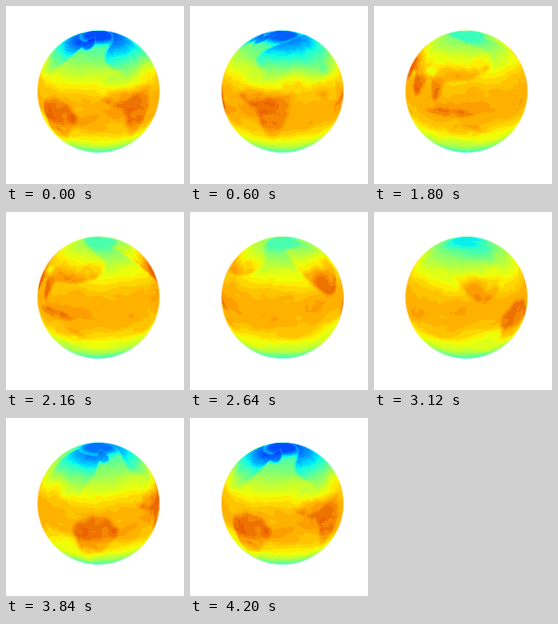
These frames come from a looping animation (178 by 178 pixels, 4320 ms). A matplotlib script:

```python
import numpy as np
import matplotlib.pyplot as plt
from matplotlib.animation import FuncAnimation

SIZE, FRAMES, STEP_MS = 178, 36, 120
CX, CY, RADIUS = 92, 85, 61
TILT = np.radians(20)
START_LON = -15

# One-degree world grid, south to north
LON, LAT = np.meshgrid(np.arange(-179.5, 180), np.arange(-89.5, 90))
SIN_LAT = np.sin(np.radians(LAT))
COS_LAT = np.cos(np.radians(LAT))


def east_of(lon):
    return (LON - lon + 180) % 360 - 180


def smoothstep(low, high, x):
    t = np.clip((x - low) / (high - low), 0, 1)
    return t * t * (3 - 2 * t)


def blur(grid, *reaches):
    for axis, reach in enumerate(reaches):
        shifts = range(-reach, reach + 1)
        grid = sum(np.roll(grid, s, axis) for s in shifts) / len(shifts)
    return grid


def noise(rng, high, wide):
    grid = blur(blur(rng.normal(size=LAT.shape), high, wide), high, wide)
    return grid / grid.std()


def oval(lon, lat, width, height):
    return (east_of(lon) / width) ** 2 + ((LAT - lat) / height) ** 2 < 1


def wedge(lon, north, south, width, lean=0):
    """Land narrowing to a point in the south, drifting east by lean."""
    t = (north - LAT) / (north - south)
    half = width * np.clip(1 - t, 0, 1) ** 0.6
    return (t >= 0) & (np.abs(east_of(lon + lean * t)) < half)


def bump(lon, lat, width, height, amount):
    return amount * np.exp(-(east_of(lon) / width) ** 2
                           - ((LAT - lat) / height) ** 2)


africa = oval(16, 19, 33, 16) | wedge(26, 8, -35, 17, -3)
asia = (oval(85, 52, 90, 25) | oval(47, 24, 11, 10)
        | wedge(78, 30, 7, 12) | wedge(103, 30, 8, 9))
north_america = wedge(-98, 72, 14, 50) | oval(-42, 72, 15, 11)
south_america = oval(-58, -8, 22, 16) | wedge(-57, -8, -54, 20, -12)
oceania = oval(134, -25, 20, 12) | oval(118, -2, 24, 4)
land = africa | asia | north_america | south_america | oceania

LAND = blur(blur(land.astype(float), 1, 1), 1, 2)
ICE = smoothstep(64, 80, LAT) * (1 - LAND)

rng = np.random.default_rng(7)
ROUGH = COS_LAT * (0.7 * noise(rng, 3, 9) + (0.3 + 0.7 * LAND) * noise(rng, 2, 3))

peru_current = bump(-88, -18, 26, 13, -5)
southern_chill = -5 * smoothstep(38, 58, -LAT)
SEA_BIAS = peru_current + southern_chill

sahel = bump(18, 11, 30, 8, 3)
arabia = bump(52, 29, 16, 9, 6)
tibet = bump(90, 34, 11, 5, -9)
sonora = bump(-108, 34, 11, 9, 5)
canada = bump(-75, 66, 35, 14, -5)
LAND_BIAS = sahel + arabia + tibet + sonora + canada


def temperature(season):
    """Surface temperature in Celsius; season runs from -1 (Jan) to 1 (Jul)."""
    shift = season * (5 + 3 * SIN_LAT)
    sea = -2 + 30 * np.clip(np.cos(np.radians(LAT - shift)), 0, 1) ** 2.1
    sea = sea + SEA_BIAS
    sea = sea + ICE * (-13 + 13 * season - sea)
    swing = np.where(LAT > 0, 18, 8) * SIN_LAT * season
    ground = 32.5 - 42 * SIN_LAT ** 2 + swing + LAND_BIAS
    return sea + LAND * (ground - sea) + ROUGH


# Orthographic view: each pixel's latitude and longitude offset
rows, cols = np.mgrid[:SIZE, :SIZE]
x, y = (cols - CX) / RADIUS, (CY - rows) / RADIUS
dist = np.hypot(x, y)
z = np.sqrt(np.clip(1 - dist ** 2, 0, 1))
sin_lat = y * np.cos(TILT) + z * np.sin(TILT)
PIX_LAT = np.degrees(np.arcsin(np.clip(sin_lat, -1, 1)))
PIX_LON = np.degrees(np.arctan2(x, z * np.cos(TILT) - y * np.sin(TILT)))
LAT_INDEX = np.clip(np.floor(PIX_LAT + 90).astype(int), 0, 179)
COVER = np.clip((1 - dist) * RADIUS / 1.5 + 0.5, 0, 1)[..., None]
JET = plt.get_cmap("jet")


def globe(frame):
    season = -np.cos(2 * np.pi * (frame - 1) / FRAMES)
    centre = START_LON + 360 * frame / FRAMES
    lon_index = np.floor(PIX_LON + centre + 180).astype(int) % 360
    heat = temperature(season)[LAT_INDEX, lon_index]
    level = np.round((0.45 + 0.01 * heat) * 50) / 50
    # Hot land is slightly muted
    shade = 1 - 0.07 * smoothstep(0.73, 0.79, level)[..., None]
    colour = JET(np.clip(level, 0.18, 0.88))[..., :3] * shade
    return 1 + COVER * (colour - 1)


fig = plt.figure(figsize=(SIZE / 100, SIZE / 100), dpi=100, facecolor="white")
ax = fig.add_axes([0, 0, 1, 1])
ax.axis("off")
picture = ax.imshow(globe(0), interpolation="nearest", aspect="auto")


def draw(frame):
    picture.set_data(globe(frame))
    return [picture]


anim = FuncAnimation(fig, draw, frames=FRAMES, interval=STEP_MS,
                     repeat=True, repeat_delay=0)
plt.show()
```
